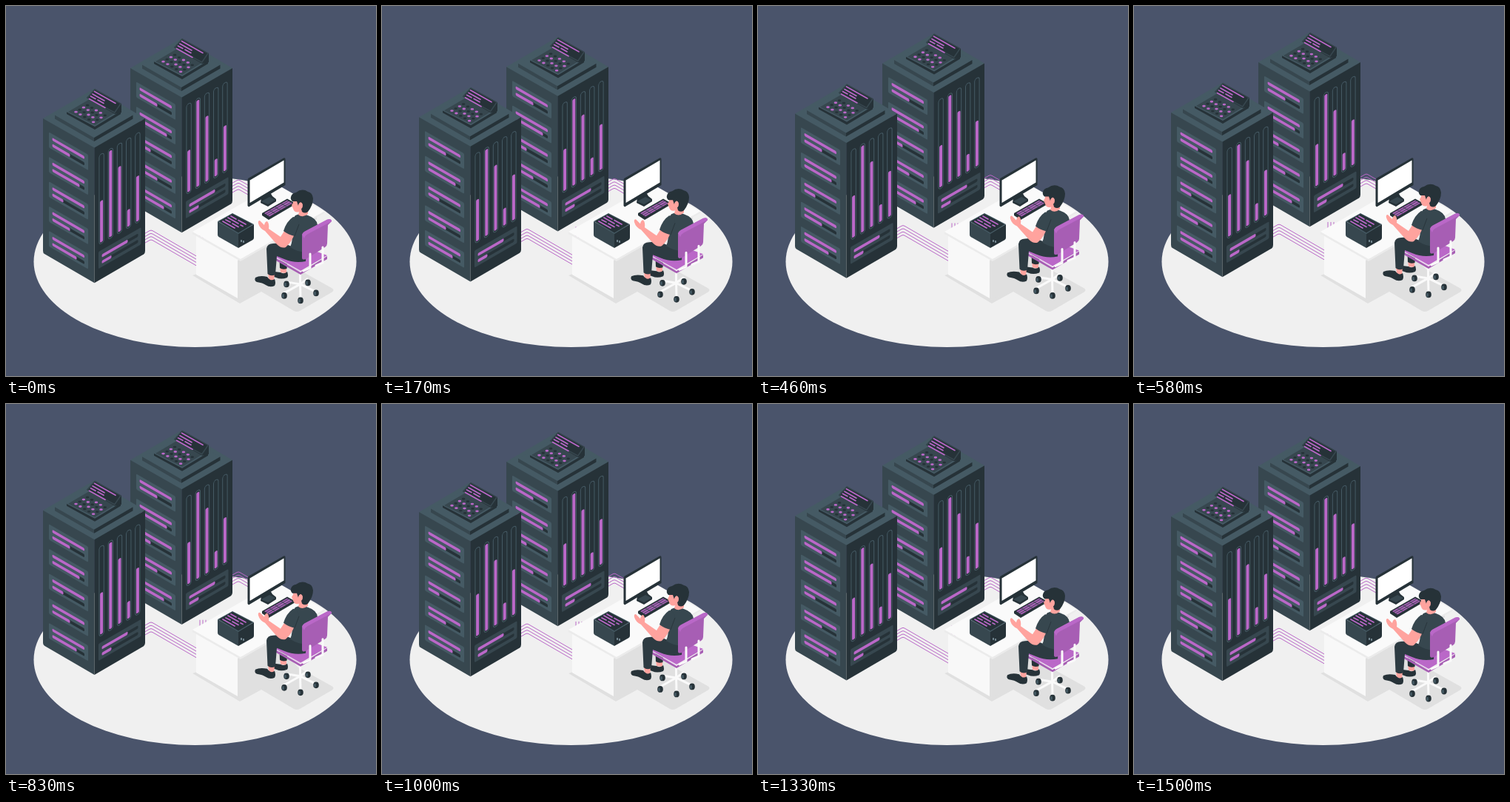
An HTML page that plays this animation: 500x500 px, repeating every 1.54 s.

```html
<!DOCTYPE html>
<html lang="en">
<head>
<meta charset="utf-8">
<title>Server room</title>
<style>
  html, body { margin: 0; width: 100%; height: 100%; overflow: hidden; background: #4a546b; }
  svg { display: block; width: 100vw; height: 100vh; }
  .purple { fill: #ba68c8; }
  .plum { fill: #a75eb4; }
  .dark { fill: #263238; }
  .mid { fill: #37474f; }
  .light { fill: #455a64; }
  .skin { fill: #ffa39e; }
  .wire { fill: none; stroke: #ba68c8; stroke-width: 1; stroke-linejoin: round; }
  .ink { fill: none; stroke: #ba68c8; stroke-width: 1.7; stroke-linecap: round; }
  .white { fill: none; stroke: #fafafa; stroke-width: 3; stroke-linecap: round; stroke-linejoin: round; }
</style>
</head>
<body>
<svg viewBox="0 0 500 500">
  <defs>
    <g id="tower">
      <g id="cables"></g>
      <path class="light" d="M50 152L119.5 111.5L188 152L119.5 193Z"/>
      <path class="mid" d="M50 152L119.5 191.5V374.3L52 335Q50 334 50 331Z"/>
      <path class="dark" d="M188 152L119.5 191.5V374.3L186 335.5Q188 334 188 331Z"/>
      <g id="left" transform="matrix(1 .577 0 1 119.5 191.5)"></g>
      <g id="right" transform="matrix(1 -.577 0 1 119.5 191.5)"></g>
      <path class="light" d="M66 147.5L119 117L171.5 147.5L119 178Z"/>
      <path class="mid" d="M66 147.5L119 178V183L66 152.5Z"/>
      <path class="dark" d="M171.5 147.5L119 178V183L171.5 152.5Z"/>
      <path class="dark" d="M82 143L120 163L155 142V146L120 167L82 146Z"/>
      <path class="light" d="M82 143L112 125L150 144L120 162Z"/>
      <path class="mid" d="M84 143L112 126.500L148 144L120 161Z"/>
      <g id="buttons"></g>
      <path class="dark" d="M120 112L156 132V144L147 146L109 124Z"/>
      <path class="mid" d="M120 112L156 132L147 145L109 124Z"/>
      <path class="dark" d="M120 113.500L154 132L146.500 143L111 124Z"/>
      <path class="ink" d="M119.500 115.500L148 131.500M117 119L133 128M114.500 122L121 125.500M124 127L132 131.500M112.500 125.500L134 137.500"/>
    </g>
  </defs>

  <ellipse cx="255.5" cy="345.5" rx="218" ry="115.5" fill="#f0f0f0"/>
  <path fill="#e0e0e0" d="M252 364L313 344L360 320L395 356L440 381Q445 384 440 387L397 412Q393 414 389 412L345 386L316 402Z"/>

  <g class="float">
    <use href="#tower" x="118" y="-68"/>
    <path class="wire" d="M262 300V315M266 300V315M270 300V315"/>
    <use href="#tower"/>
  </g>

  <!-- desk -->
  <path fill="#e0e0e0" d="M313 344L420 283V288L355 325L346 384L313 397Z"/>
  <path fill="#f8f8f8" d="M257 309L313 341V395L257 363Z"/>
  <path fill="#ebebeb" d="M252 305L317 342L430 277.500V280L317 345L252 308Z"/>
  <path fill="#fafafa" d="M252 305L365 240.500L430 277.500L317 342Z"/>

  <!-- monitor -->
  <path class="dark" d="M345 259L357 252L360 257L365 261V264L354 271L344 266Z"/>
  <path class="mid" d="M345 264L356 258L364 262L354 268Z"/>
  <path class="dark" d="M326.500 235Q326.500 233.500 328 232.500L375 205.500Q377.500 204.500 377.500 207V242L328 271.500L326.500 270Z"/>
  <path fill="#fff" d="M329.500 235.500L375.500 208.500V238.500L329.500 266Z"/>

  <!-- keyboard -->
  <path class="dark" d="M346 280L380 260.500L390 266V268.500L355 289L346 283Z"/>
  <path class="plum" d="M349 280L380 262.500L387 266.500L356 284.500Z"/>
  <path fill="none" stroke="#37474f" stroke-width=".9" d="M351 281.500L382 263.500M354 283L385 265.500M356 276L363 280M364 272L371 276M372 267L379 271"/>

  <!-- desk unit -->
  <path class="mid" d="M286 291L314 307V327L287.500 312Q286 311 286 309Z"/>
  <path class="dark" d="M335 295L314 307V327L333.500 316Q335 315 335 313Z"/>
  <path class="light" d="M286 291L306 280L335 295L314 308Z"/>
  <path class="dark" d="M288 291L306 281L333 295L314 306.500Z"/>
  <path class="ink" d="M304 284L311 288M314 289.500L324 295M300 286L314 294M317 296L320 297.500M297 289L303 292M306 294L314 298.500M293 291L309 300"/>
  <path stroke="#8aa0aa" stroke-width="1.5" d="M318 316V319M321 317V320"/>

  <g class="float">
    <!-- chair base -->
    <path class="white" d="M397.500 355V376L379 373M397.500 376L376 388M397.500 376L398 395M397.500 376L418 386M397.500 376L407 369"/>
    <g id="wheels"></g>

    <!-- far leg -->
    <path class="skin" d="M370 352L379 353V361L371 360Z"/>
    <path class="dark" d="M371 360Q376 363 380 359Q382 364 380 367Q372 370 365 367L357 364Q356 359 363 359Z"/>
    <path class="dark" d="M369 328H382L379.500 355Q374 357 370 354Z"/>

    <!-- seat -->
    <path class="plum" d="M362 339L398 360L434 338V342L398 363L363 343Z"/>
    <path class="purple" d="M362 338L393 322L434 337L398 358Z"/>
    <path fill="none" stroke="#e8caee" stroke-width="1.2" d="M363 339L398 358.500"/>

    <!-- near leg -->
    <path class="skin" d="M354 360L363 361L362 372L355 369Z"/>
    <path class="dark" d="M353 366Q358 373 363 369Q365 374 363 378Q357 381 351 377Q347 374 339 373Q335 371 337 367Q343 364 353 366Z"/>
    <path fill="#2d3b42" d="M405 345Q390 348 376 342L366 338L364 363Q358 366 353.500 362L352 328Q353 321 361 321Q373 319 386 325L406 328Z"/>

    <!-- torso and arm -->
    <path class="mid" d="M391 283Q399 279 408 283Q420 287 421 296L419 326Q405 339 384 326Q388 317 386 306Q382 293 391 283Z"/>
    <path class="skin" d="M378 301L390 308Q386 319 378 326Q372 328 366 322L350 304Q343 301 341 294Q340 290 343 290L349 296Q350 291 353 291Q356 294 355 301L371 312Z"/>
    <path class="mid" d="M388 285Q397 286 395 297L390 311Q381 309 375 304Q379 291 388 285Z"/>
    <path fill="none" stroke="#263238" stroke-width=".8" d="M396 295L390 311"/>

    <!-- head -->
    <path class="skin" d="M388 258H408V281Q401 287 395 282L396 278Q390 280 388 274L386 269L388 266Z"/>
    <path class="dark" d="M385 258Q386 253 392 252Q400 246 408 251Q414 252 415 260Q415 269 408 278Q404 281 400 278L399 274Q403 267 398 265Q396 266 395 270L393 264L387 264Q384 261 385 258Z"/>
    <ellipse class="skin" cx="398" cy="270" rx="2.8" ry="4"/>

    <!-- backrest -->
    <path class="plum" d="M400 311Q400 307 403 305L434 289Q440 287 440 291L435 296L434 321Q434 324 431 326L405 342Q400 344 400 340Z"/>
    <path class="purple" d="M400 309Q401 306 404 304.500L434 288.500Q440 287 440 291L408 308Q404 310 403 314Z"/>
    <path class="white" d="M411 335V354L402 358M428 326V347L419 351"/>
  </g>
</svg>
<script>
  const PERIOD = 1540, LOWEST = 1485, LIFT = 8.7;
  const fill = (id, html) => document.getElementById(id).innerHTML = html;
  const times = (n, make) => Array.from({ length: n }, (_, i) => make(i)).join('');
  const box = (x, y, w, h, cls, r = 1.5, extra = '') =>
    `<rect x="${x}" y="${y}" width="${w}" height="${h}" rx="${r}" class="${cls}" ${extra}/>`;
  const meter = (x, y, w, value) =>
    box(x, y, w, 4.2, 'dark') + box(x, y, value, 4.2, 'purple');

  fill('cables', times(4, i => {
    const y = i * 4.3;
    return `<path class="wire" d="M185 ${309 + y}L194 ${303.8 + y}Q196 ${302.6 + y} 198 ${303.8 + y}L264 ${342 + y}"/>`;
  }));

  const levels = [24, 37, 15, 24, 33];
  fill('left', times(5, i => {
    const y = 14.5 + i * 33.4;
    return box(-61.5, y, 53, 21, 'light') +
      meter(-57, y + 4.8, 43.5, 43.5) + meter(-57, y + 13.2, 43.5, levels[i]);
  }));

  const tops = [77, 16.5, 45, 110, 72];
  fill('right', times(5, i => {
    const x = 9.6 + i * 12.2;
    return box(x - 3.2, 14, 6.4, 121, 'dark', 3.2, 'stroke="#455a64" stroke-width="1"') +
      box(x - 2, tops[i], 4, 133 - tops[i], 'purple');
  }) + box(5.5, 144, 57.5, 23, 'mid') +
    meter(10, 150, 49, 35) + meter(10, 158.4, 49, 13));

  fill('buttons', times(20, i => {
    const a = i % 5, b = Math.floor(i / 5);
    const tone = (a + 2 * b) % 4 < 2 ? 'purple' : 'dark';
    return `<ellipse class="${tone}" cx="${94.5 + a * 5.9 + b * 5.2}" cy="${143.3 + a * 3.4 - b * 3}" rx="2.3" ry="1.4"/>`;
  }));

  const wheels = [[379, 376], [376, 391.5], [398, 398], [419, 388], [408, 374]];
  fill('wheels', times(wheels.length, i => {
    const [x, y] = wheels[i];
    return `<ellipse class="dark" cx="${x}" cy="${y}" rx="3.8" ry="4.4"/>` +
      `<ellipse class="light" cx="${x - 1.5}" cy="${y + .5}" rx="1.5" ry="2.8"/>`;
  }));

  const floating = document.querySelectorAll('.float');
  function draw(now) {
    const phase = 2 * Math.PI * (now - LOWEST) / PERIOD;
    const dy = -LIFT * (1 - Math.cos(phase)) / 2;
    floating.forEach(g => g.setAttribute('transform', `translate(0 ${dy.toFixed(3)})`));
    requestAnimationFrame(() => draw(performance.now() - start));
  }
  const start = performance.now();
  draw(0);
</script>
</body>
</html>
```
